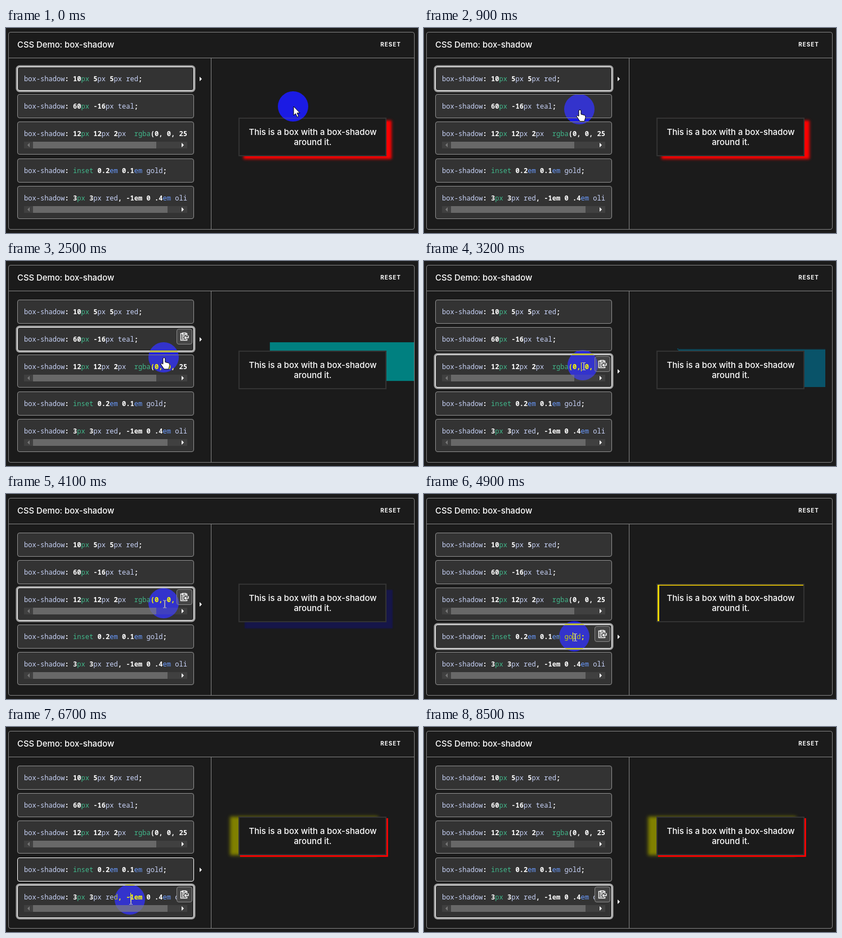
Write an HTML page that moves like this. It is 732 by 366 pixels and loops after 8600 ms.

```html
<!DOCTYPE html>
<html lang="en">
<head>
<meta charset="utf-8">
<title>CSS Demo: box-shadow</title>
<style>
  * { box-sizing: border-box; }
  html, body { margin: 0; width: 100%; height: 100%; overflow: hidden; background: #1b1b1b; }
  body { position: relative; color: #fff; font: 500 14.85px/18px Inter, sans-serif; }
  body div, svg { position: absolute; }
  #frame { left: 4px; top: 7px; width: 722px; height: 353px; border: 1px solid #858585; border-radius: 4px; }
  #title { left: 20px; top: 21px; white-space: nowrap; }
  #reset { right: 30px; top: 21px; font-size: 9.8px; font-weight: 700; letter-spacing: 1.1px; }
  #head { left: 5px; top: 53px; width: 720px; height: 1px; background: #858585; }
  #split { left: 364px; top: 54px; width: 1px; height: 305px; background: #858585; }
  #pane { left: 365px; top: 54px; width: 360px; height: 305px; overflow: hidden; }
  #result { left: 48px; top: 106px; width: 263px; height: 69px; padding: 15px 0 0 1px;
    border: 2px solid #333; background: #1b1b1b; font-size: 14.85px; text-align: center; }

  .choice { left: 20px; width: 314px; border: 1px solid; border-radius: 4px; background: #333; }
  .code { left: 11px; top: 0; width: 290px; height: 34px; overflow: hidden; white-space: pre;
    color: #c8d3f8; font: 500 12.08px/41px "Noto Sans Mono", monospace; }
  .code i { color: #41b88b; font-style: normal; }
  .code b { color: #6a9bff; font-weight: 500; }
  .code u { color: #fff; font-weight: 600; text-decoration: none; }
  .caret { top: 13px; width: 1px; height: 16px; background: #fff; }
  .bar { left: 11px; top: 35px; width: 290px; height: 12px; background: #404040; }
  .thumb { left: 16px; height: 12px; background: #686868; }
  .tri { border: 4px solid transparent; border-width: 4px 0 4px 4px; border-left-color: #fff; }
  .bar .tri { top: 2px; left: 280px; }
  .bar .back { left: 6px; transform: scaleX(-1); border-left-color: #777; }
  .mark { left: 323px; top: calc(50% - 4px); }
  .copy { left: 282px; top: 2px; width: 28px; height: 28px; border: 1px solid #8a8a8a;
    border-radius: 4px; background: #454545; }
  .copy svg { left: 5px; top: 5px; fill: none; stroke: #fff; stroke-width: 1.4; }

  #spot { width: 54px; height: 54px; margin: -27px; border-radius: 50%; background: #00f; mix-blend-mode: difference; }
  #cursor { left: 0; top: 0; overflow: visible; }
</style>
</head>
<body>
<div id="frame"></div>
<div id="title">CSS Demo: box-shadow</div>
<div id="reset">RESET</div>
<div id="head"></div>
<div id="split"></div>
<div id="pane"><div id="result">This is a box with a box-shadow around it.</div></div>
<div id="spot"></div>
<svg id="cursor" width="1" height="1"><path/></svg>
<script>
const LOOP = 8600, STEP = 100, K = 0.93;
const $ = id => document.getElementById(id);
const clamp = v => Math.min(1, Math.max(0, v));
const smooth = v => v * v * (3 - 2 * v);
const px = (...v) => v.map(n => n * K + 'px').join(' ');

// click: when the choice is picked; caret: column of the text cursor
const choices = [
  { top: 69, h: 43, click: -1000, code: '10<i>px</i> 5px 5px red;',
    shadow: px(10, 5, 5) + ' red' },
  { top: 118, h: 43, click: 1450, caret: 28, fade: 300, code: '60<i>px</i> -16px teal;',
    shadow: px(60, -16, 0) + ' teal' },
  { top: 167, h: 59, click: 3065, caret: 34, fade: 300, thumb: 219,
    code: '12<i>px</i> 12px 2px  <i>rgba</i>(0, 0, 255, .2);',
    shadow: px(12, 12, 2) + ' rgba(0, 0, 255, .2)' },
  { top: 233, h: 43, click: 4740, caret: 32, fade: 0,
    code: '<i>inset</i> 0.2<b>em</b> 0.1<b>em</b> gold;',
    shadow: 'inset .2em .1em gold' },
  { top: 282, h: 59, click: 6660, caret: 26, fade: 0, thumb: 239,
    code: '3<i>px</i> 3px red, -1<u>em</u> 0 .4<b>em</b> olive;',
    shadow: px(3, 3, 0) + ' red, -1em 0 .4em olive' }
];

// start, end, x, y
const moves = [[0, 900, 276, 145], [2200, 2700, 282, 186], [3900, 4800, 267, 254], [5700, 6600, 220, 308]];

const cursors = {
  arrow: { d: 'M1 0V16l3.6-3.2 2.6 6 2.6-1.1-2.6-5.9h5z', fill: '#fff', stroke: '#000' },
  hand: { d: 'M-1 2q2-2 4 0v7l6 1.5q2 1 2 4l-2 7h-8l-6-9q1-3 4 0z', fill: '#fff', stroke: '#000' },
  beam: { d: 'M-1-4.5h2q1 0 1 1v11q0 1-1 1h-2M5-4.5h-2q-1 0-1 1v11q0 1 1 1h2', fill: 'none', stroke: '#ccccb0' }
};

const icon = '<svg width="16" height="16"><path d="M6 2.5H1.5v12h11V12M10 2.5h2.5V7M4.5 4.5v-3h6v3z' +
  'M3.5 7h5M3.5 9.5h3M3.5 12h4M15 6v4H8.5M11 7.5L8.5 10l2.5 2.5"/></svg>';

for (const c of choices) {
  const el = c.el = document.createElement('div');
  el.className = 'choice';
  el.style.cssText = `top:${c.top}px;height:${c.h}px`;
  const code = ('box-shadow: ' + c.code).replace(/-?[\d.]+|[:;,()]/g, '<u>$&</u>');
  const bar = c.thumb ? `<div class="bar"><div class="thumb" style="width:${c.thumb}px"></div>
    <div class="tri back"></div><div class="tri"></div></div>` : '';
  el.innerHTML = `<div class="code">${code}</div>${bar}
    <div class="caret" style="left:${11 + 7.25 * (c.caret || 0)}px"></div>
    <div class="copy">${icon}</div><div class="tri mark"></div>`;
  document.body.insertBefore(el, $('spot'));
  [c.caretEl, c.copyEl, c.markEl] = ['.caret', '.copy', '.mark'].map(s => el.querySelector(s));
}

const frames = [{ offset: 0, boxShadow: choices[0].shadow }];
choices.slice(1).forEach((c, i) => frames.push(
  { offset: c.click / LOOP, boxShadow: choices[i].shadow, easing: 'ease-in-out' },
  { offset: (c.click + c.fade) / LOOP, boxShadow: c.shadow }));
frames.push({ offset: 1, boxShadow: choices[4].shadow });
const shadow = $('result').animate(frames, { duration: LOOP, fill: 'both' });
shadow.pause();

function position(t) {
  let x = 510, y = 140;
  for (const [start, end, toX, toY] of moves) {
    const p = smooth(clamp((t - start) / (end - start)));
    x += (toX - x) * p;
    y += (toY - y) * p;
  }
  return [x, y];
}

function drawChoices(t, current) {
  const age = t - choices[current].click;
  // the marker follows the click a moment later
  const marked = age < 100 ? current - 1 : current;
  const blink = age < 530 || Math.floor((age - 530) / 600) % 2 === 1;
  const show = (el, on) => el.style.display = on ? 'block' : 'none';
  choices.forEach((c, i) => {
    const on = i === current;
    c.el.style.borderColor = on || i === marked ? '#fff' : '#919191';
    c.el.style.boxShadow = on ? '0 0 0 2.5px #a0a0a0' : 'none';
    show(c.markEl, i === marked);
    show(c.copyEl, on && i);
    show(c.caretEl, on && i && blink);
  });
}

function drawCursor(t, current) {
  const [x, y] = position(t);
  const over = x > 20 && x < 334 ? choices.findIndex(c => y >= c.top && y < c.top + c.h) : -1;
  const shape = cursors[over < 0 ? 'arrow' : over === current ? 'beam' : 'hand'];
  const path = $('cursor').firstChild;
  for (const key in shape) path.setAttribute(key, shape[key]);
  path.setAttribute('transform', `translate(${x} ${y})`);
  $('spot').style.left = x + 'px';
  $('spot').style.top = y + 'px';
  $('spot').style.opacity = $('cursor').style.opacity = clamp((8500 - t) / 200);
}

function draw(now) {
  const t = Math.floor(now % LOOP / STEP) * STEP;
  const current = choices.filter(c => c.click <= t).length - 1;
  shadow.currentTime = t;
  drawChoices(t, current);
  drawCursor(t, current);
  requestAnimationFrame(draw);
}
draw(0);
</script>
</body>
</html>
```
